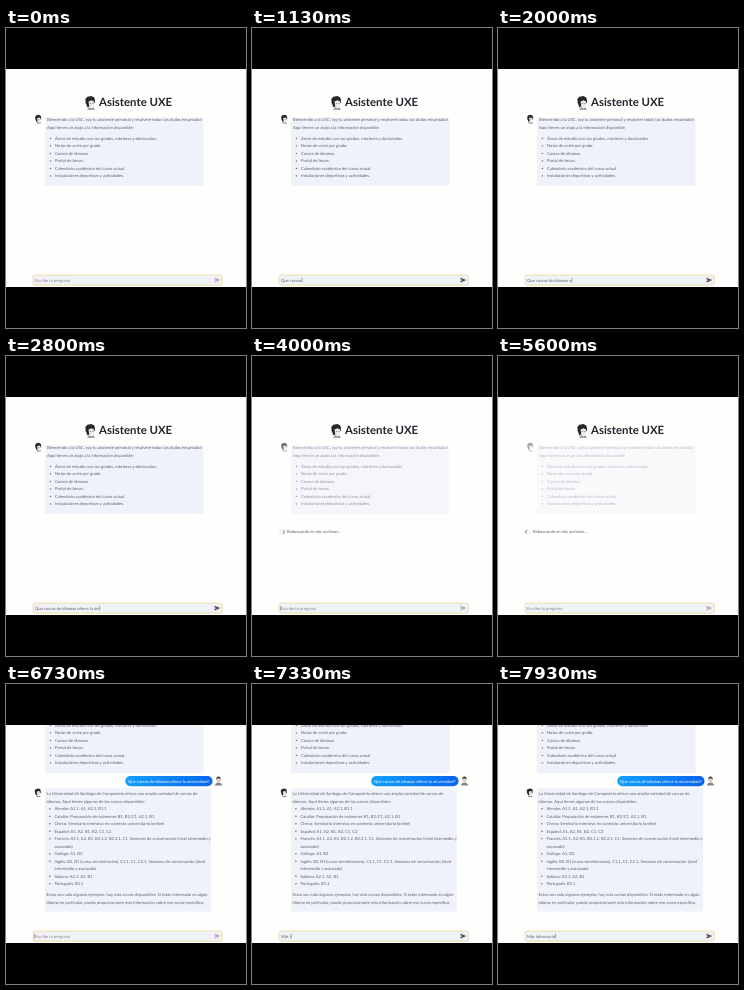
Recreate the animation shown at these times as an HTML page. Size 240 px wide and 300 px high, loop 8 s.

```html
<!DOCTYPE html>
<html lang="es">
<head>
<meta charset="utf-8">
<style>
html, body { margin: 0; width: 100%; height: 100%; overflow: hidden; background: #000; }
svg { display: block; width: 240px; height: 300px; }
text { font: 4.15px Lato, "Open Sans", sans-serif; fill: #5d5f6c; text-rendering: geometricPrecision; white-space: pre; }
.title { font-size: 11.4px; font-weight: 700; fill: #23252f; }
.box { fill: #f0f2fa; }
</style>
</head>
<body>
<svg viewBox="0 0 240 300">
  <defs>
    <clipPath id="page"><rect y="41" width="240" height="218"/></clipPath>
    <linearGradient id="blue"><stop stop-color="#14a0fa"/><stop offset="1" stop-color="#0864ee"/></linearGradient>
    <g id="bot">
      <path d="M-3 4.5L-4.8 0-5.2-4-3.2-6.2 1-7 4-5.2 4.6-1 3 1Z" fill="#26272d"/>
      <path d="M-2-1.5L1-2.8 3.6-1.5 3.4 3 1 5.2-1.2 3.5Z" fill="#efe9e6"/>
      <path d="M-3.4 6.8L-1.4 4.2 1 5.6 3 4.6 4.4 6.8Z" fill="#8c8e9b"/>
      <path d="M-.6.3H.6M1.8.3H3" stroke="#55565f" stroke-width=".7"/>
    </g>
    <g id="person">
      <path d="M-3.5 4.6Q-3.2 1.6 0 1.6T3.5 4.6Z" fill="#7d858f"/>
      <ellipse cy="-1" rx="1.9" ry="2.6" fill="#e6cfba"/>
      <path d="M-2.3-1Q-2.6-4.5 0-4.5T2.3-1L1.5-2.4H-1.5Z" fill="#3a3b40"/>
    </g>
  </defs>
  <g clip-path="url(#page)">
    <rect y="41" width="240" height="218" fill="#fefefd"/>
    <g id="content">
      <use href="#bot" x="84.5" y="75"/>
      <text class="title" x="93" y="77.5">Asistente UXE</text>
      <g id="welcome">
        <use href="#bot" transform="translate(32.4 91.2) scale(.62)"/>
        <rect class="box" x="39" y="89.5" width="158.5" height="68.5" rx="1.5"/>
      </g>
      <g id="loading">
        <circle cx="30" cy="176" r="2.3" fill="none" stroke="#e4e4e9" stroke-width=".8"/>
        <path id="arc" d="M2.3 0A2.3 2.3 0 0 1 0 2.3" fill="none" stroke="#55586a" stroke-width=".8"/>
        <text x="35" y="177.4">Rebuscando en mis archivos...</text>
      </g>
      <g id="answer">
        <rect x="119.3" y="161" width="87.2" height="10.2" rx="5" fill="url(#blue)"/>
        <text x="122" y="167.6" style="fill:#fff" id="asked"></text>
        <use href="#person" x="212.5" y="166"/>
        <use href="#bot" transform="translate(32 177.8) scale(.62)"/>
        <rect class="box" x="39" y="173.5" width="166" height="123" rx="1.5"/>
      </g>
    </g>
    <rect y="241" width="240" height="18" fill="#fefefd"/>
    <rect x="27" y="247" width="189.3" height="10.2" rx="2" fill="#f1f2f8" stroke="#efd79b" stroke-width=".8"/>
    <text id="entry" x="29" y="253.5"></text>
    <rect id="caret" y="249.8" width=".5" height="4.6" fill="#5d5f6c"/>
    <path id="send" d="M208.6 249.7L214.2 252.1 208.6 254.5V252.7L211.5 252.1 208.6 251.5Z"/>
  </g>
</svg>
<script>
const LOOP = 8000, KEY = 1000 / 15;
const SUBMIT = 3530, REPLY = 6130, FIRST_KEY = 433, NEXT_KEY = 6965;
const QUESTION = "Que cursos de idiomas ofrece la universidad?";
const FOLLOW_UP = "Más información";
const $ = id => document.getElementById(id);

function add(parent, tag, attrs, content = "") {
  const node = document.createElementNS("http://www.w3.org/2000/svg", tag);
  for (const name in attrs) node.setAttribute(name, attrs[name]);
  node.textContent = content;
  parent.append(node);
}

// Lines starting with "*" are bullets, with ">" their continuation.
function write(parent, x, y, lines) {
  for (const line of lines) {
    if (line) {
      const inset = /^[*>]/.test(line);
      if (line[0] === "*") add(parent, "circle", { cx: x + 3.4, cy: y - 1.4, r: .7, fill: "#5d5f6c" });
      add(parent, "text", { x: inset ? x + 8 : x, y }, inset ? line.slice(1) : line);
    }
    y += line ? 7.5 : 3.4;
  }
}

write($("welcome"), 41, 93.4, [
  "Bienvenido a la USC, soy tu asistente personal y resolveré todas tus dudas encantado!",
  "Aquí tienes un atajo a la información disponible:",
  "",
  "*Áreas de estudio con sus grados, másteres y doctorados.",
  "*Notas de corte por grado.",
  "*Cursos de idiomas.",
  "*Portal de becas.",
  "*Calendario académico del curso actual.",
  "*Instalaciones deportivas y actividades."
]);
write($("answer"), 40.5, 180.1, [
  "La Universidad de Santiago de Compostela ofrece una amplia variedad de cursos de",
  "idiomas. Aquí tienes algunos de los cursos disponibles:",
  "*Alemán: A1.1, A1, A2.1, B1.1",
  "*Catalán: Preparación de exámenes B1, B2/C1, A2.1, B1",
  "*Checo: Seminario intensivo en contexto universitario (online)",
  "*Español: A1, A2, B1, B2, C1, C2",
  "*Francés: A1.1, A2, B1, B2.1.2, B2.2.1, C1, Sesiones de conversación (nivel intermedio y",
  ">avanzado)",
  "*Gallego: A1, B2",
  "*Inglés: B2, B1 (curso semiintensivo), C1.1, C1, C2.1, Sesiones de conversación (nivel",
  ">intermedio y avanzado)",
  "*Italiano: A2.1, A2, B1",
  "*Portugués: B1.1",
  "",
  "Estos son solo algunos ejemplos, hay más cursos disponibles. Si estás interesado en algún",
  "idioma en particular, puedo proporcionarte más información sobre ese curso específico."
]);
$("asked").textContent = QUESTION;

const ramp = (t, from, to) => Math.min(1, Math.max(0, (t - from) / (to - from)));
const typed = (text, t, start) => text.slice(0, Math.max(0, Math.floor((t - start) / KEY)));
const show = (id, on) => $(id).style.display = on ? "" : "none";

function render(t) {
  const waiting = t >= SUBMIT && t < REPLY;
  const replied = t >= REPLY;
  const value = t < SUBMIT ? typed(QUESTION, t, FIRST_KEY) : typed(FOLLOW_UP, t, NEXT_KEY);
  const entry = $("entry");

  show("loading", waiting);
  show("answer", replied);
  $("welcome").style.opacity = waiting ? 1 - .6 * ramp(t, 3600, 4300) : 1;
  $("arc").setAttribute("transform", `translate(30 176) rotate(${(t - 4000) / 627 * 360 - 45})`);
  const scroll = 69 * (1 - (1 - ramp(t, REPLY, REPLY + 200)) ** 3);
  $("content").setAttribute("transform", `translate(0 ${-scroll})`);

  entry.textContent = value || "Escribe tu pregunta";
  entry.style.fill = value ? "#5d5f6c" : "#858793";
  $("send").setAttribute("fill", value ? "#3d404b" : "#a3a5b2");
  const blink = t >= SUBMIT && (t - 3960 + 833) % 833 < 417;
  show("caret", value || blink);
  $("caret").setAttribute("x", value ? 29.2 + entry.getComputedTextLength() : 28.5);
}

const begin = performance.now();
function tick() {
  render((performance.now() - begin) % LOOP);
  requestAnimationFrame(tick);
}
tick();
</script>
</body>
</html>
```
